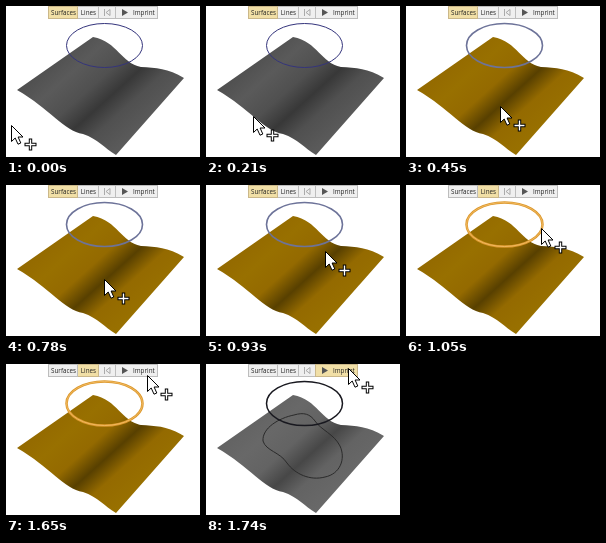
These frames come from a looping animation (194x151 px, 2370 ms). An HTML page:

```html
<!DOCTYPE html>
<html lang="en">
<head>
<meta charset="utf-8">
<title>Imprint a curve on a surface</title>
<style>
  html, body { margin: 0; width: 100%; height: 100%; overflow: hidden; background: #fff; }
  svg { display: block; width: 194px; height: 151px; }
  text { font: 6.3px "Open Sans", "Noto Sans", sans-serif; fill: #222; }

  svg { --lit: #5a5a5a; --mid: #505050; --dark: #383838; --ring: #34347c; --width: 1; }
  svg.surface, svg.line { --lit: #987000; --mid: #946a00; --dark: #584000; }
  svg.surface { --ring: #6d7399; --width: 1.6; }
  svg.line { --ring: #dc982c; --width: 2.5; }
  svg.done { --lit: #686868; --mid: #636363; --dark: #474747; --ring: #18181f; --width: 1.5; }

  .ring { fill: none; stroke: var(--ring); stroke-width: var(--width); }
  .shine, .imprint { display: none; fill: none; }
  .line .shine { display: inline; stroke: #f3bd66; stroke-width: .9; }
  .done .imprint { display: inline; stroke: #2a2a2a; stroke-width: 1; }

  .button { fill: #efefef; stroke: #bdbdbd; stroke-width: 1; }
  .start #surfaces, .surface #surfaces, .line #lines, .done #run { fill: #f1dfa6; stroke: #cbb88a; }
</style>
</head>
<body>
<svg id="stage" class="start" viewBox="0 0 194 151">
  <defs>
    <linearGradient id="shade" gradientUnits="userSpaceOnUse" x1="48" y1="53" x2="121" y2="134">
      <stop offset="0" style="stop-color: var(--mid)"/>
      <stop offset=".2" style="stop-color: var(--lit)"/>
      <stop offset=".42" style="stop-color: var(--mid)"/>
      <stop offset=".6" style="stop-color: var(--dark)"/>
      <stop offset=".77" style="stop-color: var(--mid)"/>
      <stop offset="1" style="stop-color: var(--lit)"/>
    </linearGradient>
  </defs>

  <path fill="url(#shade)" d="M87 31C112 36 115 57 135 61C150 62 162 62 178 72L110 149
    C98 142 92 133 77 128C58 125 44 103 11 84Z"/>
  <path class="imprint" d="M88 51C98 48 104 50 109 57C115 66 128 70 134 82C140 95 134 110 119 113
    C104 117 89 110 81 99C74 88 60 87 57 77C56 64 73 54 88 51Z"/>
  <ellipse class="ring" cx="98.5" cy="39.5" rx="38" ry="22"/>
  <ellipse class="shine" cx="98.5" cy="39.5" rx="38" ry="22"/>

  <g>
    <rect class="button" x="92.5" y=".5" width="17" height="12"/>
    <rect class="button" id="run" x="109.5" y=".5" width="42" height="12"/>
    <rect class="button" id="lines" x="71.5" y=".5" width="21" height="12"/>
    <rect class="button" id="surfaces" x="42.5" y=".5" width="29" height="12"/>
    <path d="M98.5 3v7M104 3.5v6l-4-3z" fill="none" stroke="#a2a2a2" stroke-width=".9"/>
    <path d="M116 3v7l6-3.5z" fill="#555"/>
    <text x="45" y="9">Surfaces</text>
    <text x="74.8" y="9">Lines</text>
    <text x="127" y="9">Imprint</text>
  </g>

  <g id="cursor">
    <path d="M.5 .5V16.5L4.2 13L7 19.2L9.8 18L7.1 12H12Z" fill="#fff" stroke="#000"/>
    <path d="M19.5 13.5v12M13.5 19.5h12" stroke="#000" stroke-width="3.4"/>
    <path d="M19.5 14.5v10M14.5 19.5h10" stroke="#fff" stroke-width="1.4"/>
  </g>
</svg>
<script>
  const LOOP = 2370, STEP = 30;
  const stage = document.getElementById("stage");
  const cursor = document.getElementById("cursor");

  // Each move begins one step after `at` and lasts `steps` steps.
  const moves = [
    { at: 0, steps: 15, from: [5, 119], to: [94, 100] },
    { at: 750, steps: 10, from: [94, 100], to: [135, 43] },
    { at: 1380, steps: 11, from: [135, 43], to: [142, 4] },
  ];

  function cursorAt(t) {
    const { at, steps, from, to } = moves.findLast(move => t >= move.at);
    const p = Math.min(Math.floor((t - at) / STEP) / steps, 1);
    return from.map((v, i) => Math.round(v + (to[i] - v) * p));
  }

  function stateAt(t) {
    return t < 450 ? "start" : t < 1050 ? "surface" : t < 1740 ? "line" : "done";
  }

  function draw() {
    const t = performance.now() % LOOP;
    stage.setAttribute("class", stateAt(t));
    cursor.setAttribute("transform", `translate(${cursorAt(t)})`);
    requestAnimationFrame(draw);
  }
  draw();
</script>
</body>
</html>
```
